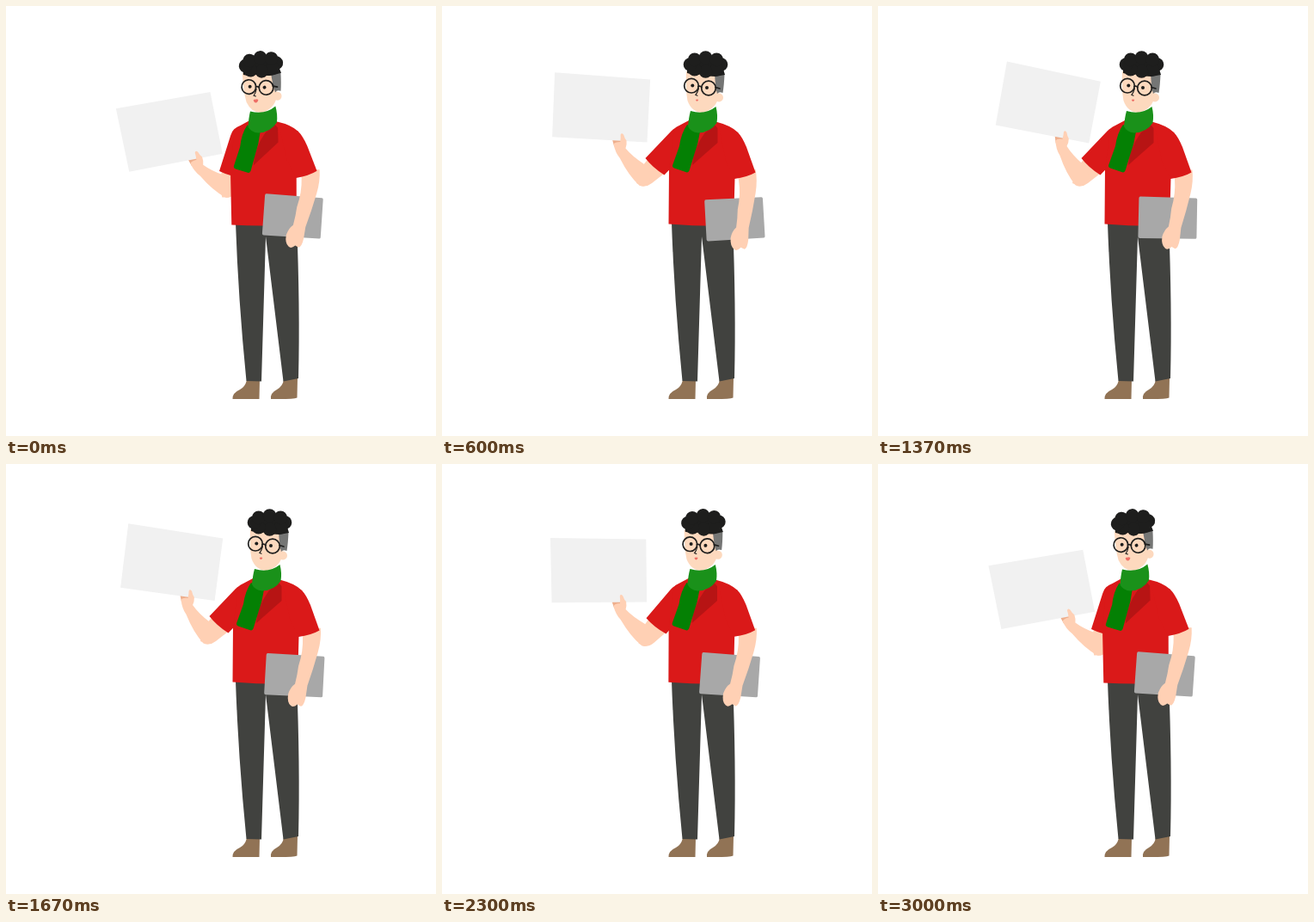
An HTML page for the animation above (3030 ms loop, 500 px wide and 500 px high).

```html
<!DOCTYPE html>
<html lang="en">
<head>
<meta charset="utf-8">
<title>Presenter with a board</title>
<style>
  html, body { margin: 0; width: 100%; height: 100%; overflow: hidden; background: #fff; }
  svg { display: block; width: 100vw; height: 100vh; }
  .skin { fill: #ffd0b4; }
  .face { fill: #fdd9be; }
  .shirt { fill: #da1919; }
  .hair { fill: #1e1e1d; }
  .line { fill: none; stroke: #1e1e1d; stroke-linecap: round; }
</style>
</head>
<body>
<svg viewBox="0 0 500 500">
  <g id="legs">
    <path fill="#917355" d="M280 435H295L294.500 457H263.500Q263 450 272 446Q278 443 280 435Z
      M323 434L339 432.500L338.500 455.500Q334 457.500 308 457Q307 450 315 446Q322 442 323 434Z"/>
    <path fill="#41423f" d="M267 252H338Q342 350 340 433L322.500 436.500L302 268L297 436.500L279.500 436Q270 340 267 252Z"/>
  </g>
  <g id="body">
    <g id="arm">
      <path class="skin" d="M241 176L262 192L244 206Q239 210 234 209.500L226 206L230 190Z"/>
      <g id="fore">
        <path fill="#eeae8c" d="M202.500 153H213L212 160L204 161Z"/>
        <path fill="#f1f1f1" d="M142 69.500L252 86.500L242.500 159L133 144Z"/>
        <path class="skin" d="M203.500 158Q205 155.500 211.500 156Q212.500 151 212.500 147.500
          Q214 145 216 148Q217 153 218.800 155Q219 160 217 164Q224 174 236.500 183.500L244 195
          L241 206Q235 211.500 229.500 208.500Q218 196 209.500 175Q204.500 168 203.500 158Z"/>
      </g>
      <path class="shirt" d="M284 141Q273 138 266.500 145.500L236.500 177Q245 188 258.500 196.500L282 172Z"/>
    </g>
    <path class="shirt" d="M272 141L289 132L320 135Q336 139 344 147L352 170L340.500 200L339 255.500
      Q300 256.500 263.500 253.500L264 190L269 150Z"/>
    <path fill="#b71414" d="M317 138L320.500 142V159L291 185Q292 166 306 147Z"/>

    <g id="elbow">
      <g id="lap">
        <path fill="#a8a8a8" d="M306 223.500L370.500 222.800Q372 222.800 372.100 224.500L373 268.500
          Q373 270 371.500 270.200L307 271.800Q305.200 271.800 305 270L304.300 225.500Q304.300 223.500 306 223.500Z"/>
        <path class="skin" d="M343 192L365 190Q367 203 364 218Q360 238 354.500 258L353.500 272
          Q352 282 348.500 282.500L344.500 280.500Q340 285 337 282.500Q332 279 333 269Q335 261 340 257
          Q342 246 342.500 236Q347 218 345 202Z"/>
      </g>
    </g>
    <path class="shirt" d="M322 140L344 147Q349 152 354 164L364.500 193.500Q355 199 340 201L330 180Z"/>

    <g id="head">
      <path class="face" d="M284 76H324L321 108Q317 121 302 124Q290 123 285.500 110Q283 98 284 76Z"/>
      <circle class="face" cx="322" cy="106.500" r="5"/>
      <path fill="#757675" d="M317 79H328.500Q328 92 326.500 101Q322 99 320 102Q318 96 317 79Z"/>
      <g class="hair" id="curls">
        <path d="M285 66L304 60L325 66L329 80L318 82Q308 82 303 79Q293 81 285 78Z"/>
      </g>
      <g id="eyes" class="hair">
        <circle cx="291.300" cy="92.500" r="2"/>
        <circle cx="308" cy="95" r="2"/>
      </g>
      <g class="line" stroke-width="1.700">
        <circle cx="290" cy="92.700" r="8.300"/>
        <circle cx="310" cy="95.500" r="8.300"/>
        <path d="M298 93.500Q300 92.500 301.800 94.500M318 94.500L323 96"/>
      </g>
      <path class="line" stroke-width="1.100" d="M298.500 96Q297 101 294.800 103.300L297 104.300"/>
      <path id="mouth" fill="#ee6f66" d="M-3 -1Q-1 -2.400 0 -1.500Q1 -2.400 3 -.800Q2 2.500 -.300 2.500Q-2.500 2 -3 -1Z"/>
    </g>

    <path fill="#048004" d="M285 138L300 146Q298 160 293.500 172L288 190Q287 194 284 193.300L270 188.500
      Q267 187 268.500 184L276 163Q278 148 285 138Z"/>
    <path fill="#1a911a" d="M289 122Q306 127 318.500 117Q321 127 319.500 136Q312 147 298 147.500
      Q289 146.500 286 140Q287 129 289 122Z"/>
  </g>
</svg>
<script>
const LOOP = 3030;
const el = id => document.getElementById(id);

const span = (t, from, to) => Math.min(1, Math.max(0, (t - from) / (to - from)));
const ease = s => s * s * (3 - 2 * s);

// Eases from 0 to 1 over a..b, holds, then eases back over c..d.
const bump = (t, a, b, c, d) => ease(span(t, a, b)) - ease(span(t, c, d));

// Board lift: slows down into the top, then sinks almost evenly.
function lift(t) {
  const top = 1370;
  return t < top
    ? 1 - (1 - span(t, 0, top)) ** 1.8
    : 1 - span(t, top, LOOP) ** 1.15;
}

// A ring of round curls around the top of the head.
function addCurls() {
  for (let i = 0; i < 8; i++) {
    const angle = i * Math.PI / 4;
    const c = document.createElementNS("http://www.w3.org/2000/svg", "circle");
    c.setAttribute("cx", 306.5 + 18 * Math.cos(angle));
    c.setAttribute("cy", 68 + 8 * Math.sin(angle));
    c.setAttribute("r", 7.8);
    el("curls").append(c);
  }
}

function turn(id, angle, x, y) {
  el(id).setAttribute("transform", `rotate(${angle.toFixed(3)} ${x} ${y})`);
}

function draw(t) {
  // Absolute angles in degrees; nested parts subtract their parent's.
  const rest = 1 - bump(t, 0, 600, 2100, LOOP);
  const lean = -1.65 * rest;
  const arm = -26 * rest;
  const fore = -18.8 + 22 * lift(t);
  const head = -5.5 * (1 - bump(t, 0, 600, 1750, LOOP));
  const lap = 5 - 7.2 * bump(t, 0, 560, 560, 1970);

  turn("body", lean, 300, 296);
  turn("head", head - lean, 303, 120);
  turn("arm", arm - lean, 275, 150);
  turn("fore", fore - arm, 234, 209);
  turn("elbow", -0.5 * lean, 300, 296);
  turn("lap", lap - 0.5 * lean, 355, 202);

  const talk = 0.72 + 0.24 * Math.cos(6 * Math.PI * t / LOOP);
  el("mouth").setAttribute("transform", `translate(296.600 109.500) scale(${talk})`);

  const lid = Math.max(0.25, span(Math.abs(t - 1970), 0, 130));
  el("eyes").setAttribute("transform", `translate(0 ${94 * (1 - lid)}) scale(1 ${lid})`);
}

addCurls();
const start = performance.now();
function tick() {
  draw((performance.now() - start) % LOOP);
  requestAnimationFrame(tick);
}
tick();
</script>
</body>
</html>
```
